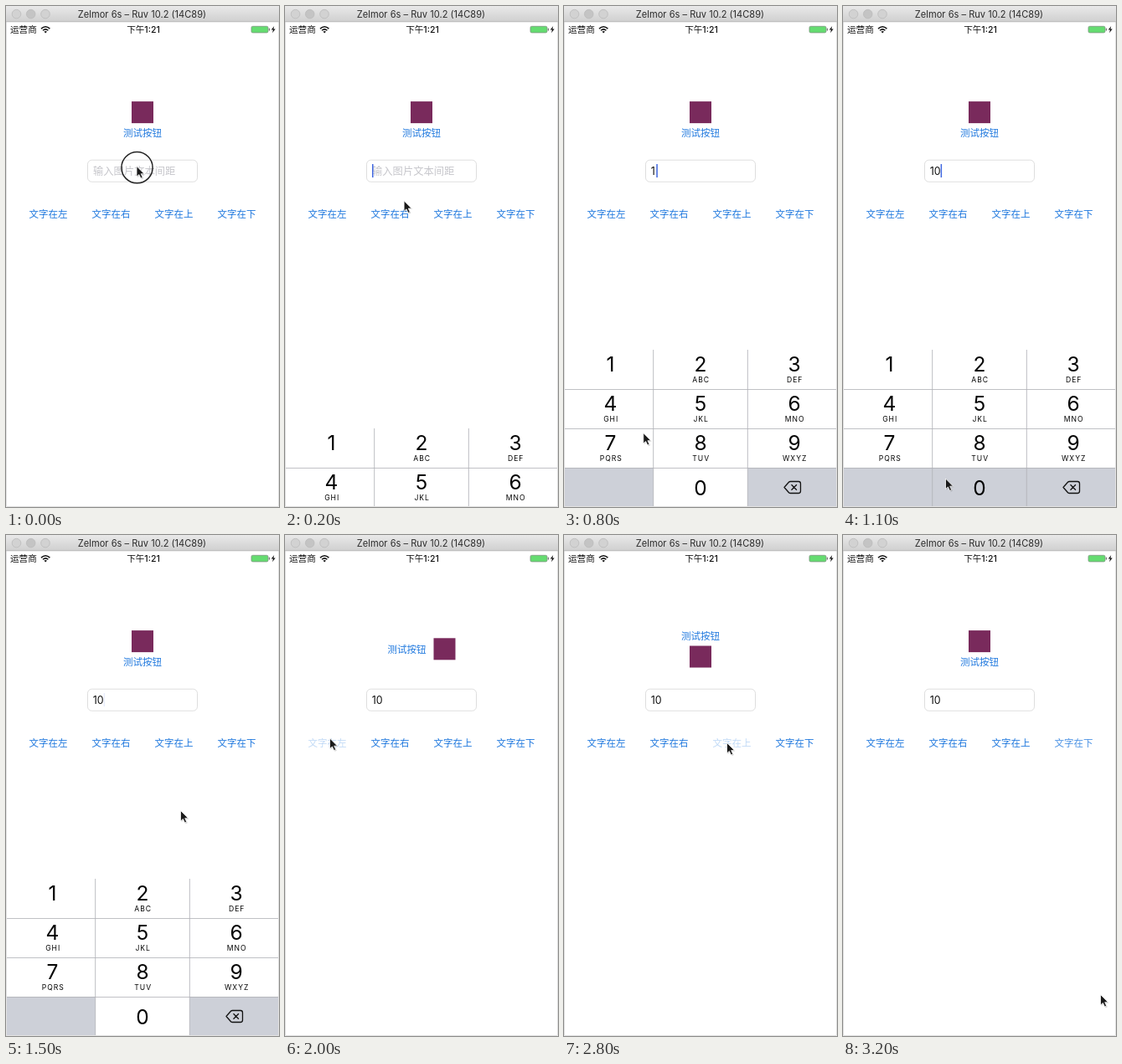
Write an HTML page that moves like this. It is 326 by 599 pixels and loops after 3300 ms.

```html
<!DOCTYPE html>
<html lang="zh-CN">
<head>
<meta charset="utf-8">
<title>Button layout demo</title>
<style>
  html, body { margin: 0; width: 100%; height: 100%; overflow: hidden; background: #fff; }
  svg { display: block; width: 326px; height: 599px; }
  text { font-family: Inter, "Noto Sans CJK SC", "Noto Sans CJK JP", "Noto Sans CJK", sans-serif; }
  .mid { text-anchor: middle; }
  .link { font-size: 11.5px; fill: #1f78de; }
  .digit { font-size: 24.5px; fill: #050505; }
  .abc { font-size: 8.6px; letter-spacing: 1px; fill: #050505; }
</style>
</head>
<body>
<svg viewBox="0 0 326 599">
  <defs>
    <linearGradient id="bar" x2="0" y2="1">
      <stop stop-color="#e9e9e9"/>
      <stop offset="1" stop-color="#cfcfcf"/>
    </linearGradient>
  </defs>
  <rect width="326" height="599" fill="#fff"/>

  <!-- tested button -->
  <rect id="icon" width="26" height="26" fill="#792a5c"/>
  <text id="label" class="link mid">测试按钮</text>

  <!-- text field -->
  <rect x="97.5" y="184.2" width="131" height="26" rx="5" fill="#fff" stroke="#dedede"/>
  <text id="hint" x="104" y="201.8" font-size="12.3" fill="#c6c6cb">输入图片文本间距</text>
  <text id="value" x="103.8" y="201.8" font-size="12.4" fill="#111"></text>
  <rect id="caret" y="189" width="1.5" height="16" fill="#4067e0"/>

  <g id="options"></g>
  <g id="keyboard"></g>

  <!-- status bar -->
  <g fill="#111">
    <text x="5" y="32" font-size="10.6">运营商</text>
    <text class="mid" x="164" y="32" font-size="10.6" font-weight="500">下午1:21</text>
    <path d="M42 27.1Q47.2 22.3 52.4 27.1M44 29.3Q47.2 26.4 50.4 29.3"
          fill="none" stroke="#111" stroke-width="1.5"/>
    <path d="M45.4 30.6Q47.2 29.2 49 30.6L47.2 32.4Z"/>
    <rect x="293" y="24.3" width="20" height="7.6" rx="1.6" fill="#65dc71" stroke="#7d957f" stroke-width=".8"/>
    <rect x="313.8" y="26.5" width="1.2" height="3.2" rx=".6" fill="#777"/>
    <path d="M320.2 24L316.8 28.6H319L318 32.2L321.7 27.4H319.4Z"/>
  </g>

  <!-- window frame -->
  <path d="M.5 19V598.5H325.5V19" fill="none" stroke="#e2e2e2"/>
  <rect width="326" height="19" fill="url(#bar)"/>
  <path d="M0 18.8H326" stroke="#b4b4b4" stroke-width=".8"/>
  <g fill="#d2d2d2" stroke="#bababa" stroke-width=".8">
    <circle cx="12.5" cy="9.6" r="5.3"/>
    <circle cx="29.7" cy="9.6" r="5.3" fill="#c4c4c4"/>
    <circle cx="47" cy="9.6" r="5.3"/>
  </g>
  <text class="mid" x="162.5" y="13.6" font-size="11.1" fill="#2c2c2c">Zelmor 6s – Ruv 10.2 (14C89)</text>

  <g id="pointer">
    <circle id="ring" cx=".5" cy="1.7" r="18.6" fill="none" stroke="#222" stroke-width="1.5"/>
    <path d="M1 1.5V13.6L3.8 11L6 15.7L8.3 14.7L6.2 10.2H10Z" opacity=".18"/>
    <path d="M0 0V12.6L2.9 10L5 14.6L7.2 13.6L5.2 9.2H9.1Z" fill="#1a1a1a" stroke="#fff" stroke-width=".8"/>
  </g>
</svg>

<script>
const LOOP = 3300, STEP = 100;
const GREY = '#cdd0d8';
const $ = id => document.getElementById(id);
const clamp = k => Math.min(1, Math.max(0, k));
const smooth = k => (k = clamp(k), k * k * (3 - 2 * k));
const mix = (a, b, k) => a + (b - a) * k;

function set(el, attrs) {
  for (const name in attrs) el.setAttribute(name, attrs[name]);
}
function add(parent, tag, attrs, text = '') {
  const el = document.createElementNS('http://www.w3.org/2000/svg', tag);
  set(el, attrs);
  el.textContent = text;
  return parent.appendChild(el);
}

// dx, dy: the side of the icon on which the label sits
const options = [
  { side: '左', at: 1900, dx: -1, dy: 0 },
  { side: '右', at: 2300, dx: 1, dy: 0 },
  { side: '上', at: 2700, dx: 0, dy: -1 },
  { side: '下', at: 3000, dx: 0, dy: 1 }
];
options.forEach((option, i) => {
  option.el = add($('options'), 'text', { class: 'link mid', x: 50.5 + 75 * i, y: 253 },
    '文字在' + option.side);
});

// Number pad
const edges = [0, 106.7, 219.3, 326], centres = [55.5, 163, 275];
const captions = ['', 'ABC', 'DEF', 'GHI', 'JKL', 'MNO', 'PQRS', 'TUV', 'WXYZ'];
const pad = $('keyboard');
const keys = {};

function addKey(digit, col, row, caption) {
  const y = 411 + 47 * row;
  keys[digit] = add(pad, 'rect',
    { x: edges[col], y, width: edges[col + 1] - edges[col], height: 47, fill: '#fff' });
  add(pad, 'text', { class: 'digit mid', x: centres[col], y: y + (digit ? 26.3 : 33) }, digit);
  add(pad, 'text', { class: 'abc mid', x: centres[col] + .7, y: y + 39.3 }, caption);
}
add(pad, 'rect', { y: 411, width: 326, height: 188, fill: GREY });
captions.forEach((caption, i) => addKey(i + 1, i % 3, Math.floor(i / 3), caption));
addKey(0, 1, 3, '');
add(pad, 'path', {
  d: 'M0 458.5H326M0 505.5H326M0 552.5H326M106.7 411V599M219.3 411V599',
  fill: 'none', stroke: '#b0b2b7', 'stroke-width': .8
});
add(pad, 'path', {
  d: 'M263 575.5L268.5 569.3Q269.2 568.5 270.5 568.5H280Q282.5 568.5 282.5 571V580Q282.5 582.5 280 582.5H270.5Q269.2 582.5 268.5 581.7Z'
    + 'M271.5 572.3L277.9 578.7M277.9 572.3L271.5 578.7',
  fill: 'none', stroke: '#111', 'stroke-width': 1.3, 'stroke-linejoin': 'round'
});

// The pointer rests for one step on either side of each tap
const taps = [
  { at: 0, x: 156, y: 191.5 },
  { at: 600, x: 67, y: 456, key: 1 },
  { at: 1000, x: 122.5, y: 565, key: 0 },
  { at: 1600, x: 208.5, y: 329.5 },
  ...options.map(({ at }, i) => ({ at, x: 53.5 + 70.5 * i, y: 243 + 2.7 * i })),
  { at: LOOP, x: 307.5, y: 549.5 }
];
const inputs = [100, 700, 1100]; // focus, then one digit each

function drawPointer(t) {
  const i = taps.findIndex(tap => tap.at > t);
  const from = taps[i - 1], to = taps[i];
  const k = smooth((t - from.at - STEP) / (to.at - from.at - 2 * STEP));
  const x = mix(from.x, to.x, k), y = mix(from.y, to.y, k);
  $('pointer').setAttribute('transform', `translate(${x} ${y})`);
  $('ring').setAttribute('opacity', t === from.at ? 1 : 0);
}

function drawKeyboard(t) {
  const shown = smooth((t - 100) / 200) - smooth((t - 1600) / 200);
  pad.setAttribute('transform', `translate(0 ${188 * (1 - shown)})`);
  for (const { key, at } of taps) {
    if (key === undefined) continue;
    keys[key].setAttribute('fill', t >= at && t < at + 2 * STEP ? GREY : '#fff');
  }
}

function drawField(t) {
  const done = inputs.filter(at => at <= t);
  const value = '10'.slice(0, Math.max(0, done.length - 1));
  const idle = t - done[done.length - 1];
  $('value').textContent = value;
  $('hint').setAttribute('opacity', value ? 0 : 1);
  set($('caret'), {
    x: 104 + value.length * 6.3,
    opacity: done.length && t < 1600 ? mix(1, .12, clamp(idle / STEP - 3)) : 0
  });
}

function drawButton(t) {
  let layout = options[3];
  for (const option of options) {
    const age = t - option.at;
    if (age > 0) layout = option;
    option.el.setAttribute('opacity', age < 0 ? 1 : mix(.2, 1, clamp(age / 220) ** 3));
  }
  const { dx, dy } = layout;
  set($('icon'), { x: 150 - 27.5 * dx, y: 123.3 - 9.2 * dy });
  set($('label'), { x: 163 + 17.5 * dx, y: 140.5 + 15.4 * dy });
}

const start = performance.now();
function tick() {
  const now = (performance.now() - start) % LOOP;
  const t = Math.floor(now / STEP) * STEP;
  [drawPointer, drawKeyboard, drawField, drawButton].forEach(draw => draw(t));
  requestAnimationFrame(tick);
}
tick();
</script>
</body>
</html>
```
